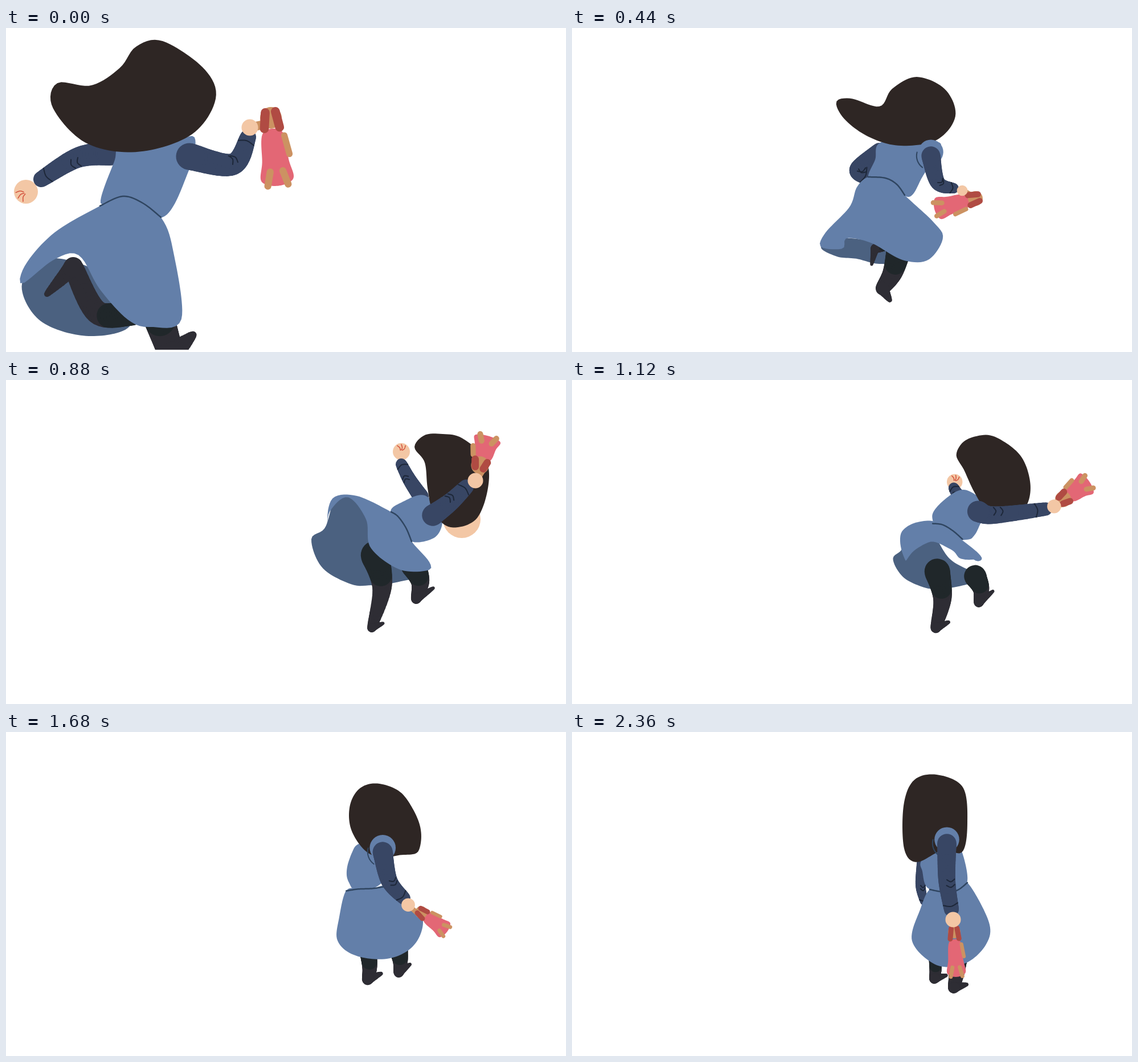
An HTML page with a canvas for the animation above (2720 ms loop, 983 by 570 pixels).

```html
<!DOCTYPE html>
<html lang="en">
<head>
<meta charset="utf-8">
<title>Running girl</title>
<style>
html, body { margin: 0; width: 100%; height: 100%; overflow: hidden; background: #fff; }
canvas { display: block; width: 100vw; height: 100vh; }
</style>
</head>
<body>
<canvas id="stage" width="983" height="570"></canvas>
<script>
const LOOP = 2720;
const BLUE = '#637fa9', SHADE = '#4b6180', NAVY = '#384664', HAIR = '#2e2624', SKIN = '#f3c7a5';
const LEG = '#2e2d34', THIGH = '#20272a', INK = '#1d2738', SEAM = '#2f4560';
const TAN = '#cc9262', PINK = '#e36775', RUST = '#b04b43', RED = '#d4553f';

// Blobs are outlines. Arms: shoulder, elbow, wrist, hand; legs: hip, knee, ankle, toe;
// both end with their widths. Doll: head x, y, angle in degrees, length, girth.
const stride = {
  at: 0,
  hair: '275,23 348,72 368,125 325,188 230,218 140,202 82,140 90,97 150,101 200,70 228,33',
  torso: '205,205 300,195 332,195 318,258 275,333 205,298 166,308 190,235',
  skirt: '205,296 240,308 272,333 292,385 308,512 255,526 215,514 165,460 128,400 85,407 28,450 35,415 85,360 165,313',
  under: '28,450 60,515 145,542 220,520 180,440 80,405',
  farArm: '185,220 126,228 62,266 35,288 44,28',
  nearArm: '322,226 398,240 425,192 428,175 48,28',
  legA: '220,500 160,500 118,420 72,468 48,34',
  legB: '262,490 275,530 290,575 328,540 60,44',
  collar: '250,190 230,180', face: '280,110',
  doll: [465, 158, 84, 128, 56]
};
const push = {
  at: 200,
  hair: '425,45 515,80 547,135 515,178 445,172 360,137 300,143 262,155 268,122 320,80 375,53',
  torso: '375,195 430,195 488,190 460,245 432,336 380,299 340,303 378,230',
  skirt: '375,299 405,310 427,336 488,395 480,450 430,480 372,448 318,416 292,422 284,445 217,444 230,408 270,387 310,325 340,303',
  under: '217,446 245,474 300,499 362,502 430,480 350,430 290,415',
  farArm: '385,220 342,260 352,285 372,285 40,34',
  nearArm: '470,220 483,282 540,250 549,243 46,26',
  legA: '350,410 335,490 298,568 285,590 76,40',
  legB: '470,415 488,450 503,485 523,450 44,18',
  collar: '456,183 422,202', face: '470,110',
  doll: [572, 230, -86, 82, 58]
};
const gather = {
  at: 440,
  hair: '605,86 655,108 673,155 640,197 575,207 520,191 478,160 464,130 490,124 540,138 562,107',
  torso: '545,200 640,200 640,220 615,262 598,293 582,294 545,264 520,263 532,232',
  skirt: '550,264 570,275 584,294 635,342 651,370 625,408 580,408 525,378 482,370 475,388 437,385 445,360 487,315 500,280 520,262',
  under: '437,385 465,402 500,406 540,415 590,408 540,380 480,370',
  farArm: '540,218 503,248 515,260 532,252 32,30',
  nearArm: '630,225 642,272 670,282 685,286 34,18',
  legA: '555,380 542,385 532,388 526,416 20,16',
  legB: '575,385 563,430 545,458 558,479 46,24',
  collar: '600,180 570,170', face: '620,150',
  doll: [708, 300, -195, 79, 38]
};
const spin = {
  at: 880,
  hair: '800,102 842,140 846,190 825,245 780,259 750,232 740,190 735,145 717,118 735,97 765,95',
  torso: '735,203 765,240 755,275 715,285 700,260 675,232 695,215',
  skirt: '688,240 702,260 712,284 743,320 740,335 690,333 640,295 632,245 600,206 568,232 564,268 566,225 580,204 620,205 676,232',
  under: '536,280 555,330 605,359 640,361 690,355 738,337 660,300 620,215 580,208 560,260',
  farArm: '728,205 708,175 694,148 694,126 28,20',
  nearArm: '749,238 780,215 808,188 824,177 38,26',
  legA: '648,308 660,365 642,436 662,428 52,16',
  legB: '715,325 727,355 720,385 750,366 46,18',
  collar: '800,200 800,180', face: '800,245',
  doll: [832, 150, -74, 57, 46]
};
const stagger = {
  at: 1440,
  hair: '665,97 715,122 755,160 755,200 715,229 675,212 628,180 618,140 633,106',
  torso: '630,180 688,205 660,230 660,262 650,275 578,277 575,250 592,208',
  skirt: '600,274 625,273 650,275 690,292 738,300 735,348 700,382 645,391 600,378 578,335 576,280',
  under: '600,360 650,375 690,360 640,320',
  farArm: '630,215 635,235 638,245 642,250 20,16',
  nearArm: '664,222 688,268 722,279 736,283 38,20',
  legA: '632,375 637,410 634,436 660,423 38,22',
  legB: '698,372 706,385 706,400 724,379 32,16',
  collar: '632,186 618,197', face: '690,165',
  doll: [762, 289, 20, 62, 34]
};
const settle = {
  at: 1960,
  hair: '645,84 683,98 694,140 692,200 684,222 650,205 605,221 584,195 584,130 605,92',
  torso: '610,215 655,180 680,195 690,260 670,278 622,279 608,235',
  skirt: '640,279 665,278 689,267 717,330 718,372 690,404 640,413 590,395 569,360 595,325 622,279',
  under: '610,380 650,395 690,380 650,340',
  farArm: '614,225 614,250 622,270 632,268 22,16',
  nearArm: '658,198 655,255 671,308 671,329 33,26',
  legA: '640,395 640,420 636,434 657,427 24,18',
  legB: '678,395 676,425 670,450 692,443 36,20',
  collar: '640,150 640,130', face: '640,140',
  doll: [690, 350, 57, 59, 28]
};
const rest = {
  at: 2360,
  hair: '640,75 686,97 694,160 685,211 650,208 605,229 583,205 582,130 600,85',
  torso: '614,225 650,185 678,195 694,262 665,281 625,275 615,245',
  skirt: '650,281 675,279 694,265 732,335 726,375 690,407 640,410 597,368 612,310 628,277',
  under: '610,380 650,395 690,380 650,340',
  farArm: '616,230 612,270 618,298 632,302 22,14',
  nearArm: '658,196 658,260 666,312 669,330 34,26',
  legA: '638,395 638,420 636,434 657,428 24,18',
  legB: '678,395 675,425 670,450 693,444 34,20',
  collar: '640,150 640,130', face: '640,140',
  doll: [671, 352, 87, 84, 32]
};

// From each moment on, the picture holds this long
const RHYTHM = [[0, 40], [40, 80], [440, 40], [520, 80], [880, 40], [920, 80], [1120, 80], [1840, 120], [2360, 360]];

const mix = (a, b, u) => Array.isArray(a) ? a.map((v, i) => mix(v, b[i], u)) : a + (b - a) * u;
const bump = (t, mid, half) => Math.max(0, 1 - Math.abs(t - mid) / half);
const parse = text => text.split(' ').map(pair => pair.split(',').map(Number));

// Catmull-Rom curve through the points
function curve(p, closed, steps = 12) {
  const n = p.length, out = [];
  const at = i => closed ? p[(i + n) % n] : p[Math.max(0, Math.min(n - 1, i))];
  for (let i = 0; i < (closed ? n : n - 1); i++) {
    const [a, b, c, d] = [-1, 0, 1, 2].map(k => at(i + k));
    for (let k = 0; k < steps; k++) {
      const t = k / steps;
      out.push([0, 1].map(j => b[j] + t / 2 * (c[j] - a[j] +
        t * (2 * a[j] - 5 * b[j] + 4 * c[j] - d[j] + t * (3 * b[j] - a[j] - 3 * c[j] + d[j])))));
    }
  }
  out.push(closed ? p[0] : p[n - 1]);
  return out;
}

// Even spacing lets outlines with different point counts blend
function even(line, count = 110) {
  const len = [0];
  for (let i = 1; i < line.length; i++)
    len.push(len[i - 1] + Math.hypot(line[i][0] - line[i - 1][0], line[i][1] - line[i - 1][1]));
  let j = 1;
  return Array.from({ length: count }, (_, i) => {
    const want = len[len.length - 1] * i / count;
    while (len[j] < want) j++;
    return mix(line[j - 1], line[j], (want - len[j - 1]) / (len[j] - len[j - 1] || 1));
  });
}

function prepare(pose) {
  const out = {};
  for (const [name, value] of Object.entries(pose)) {
    const pts = typeof value === 'string' ? parse(value) : value;
    out[name] = /hair|torso|skirt|under/.test(name) ? even(curve(pts, true)) : pts;
    if (name === 'skirt') out.waist = [pts[pts.length - 1], ...pts.slice(0, 3)];
  }
  return out;
}
const POSES = [stride, push, gather, spin, stagger, settle, rest].map(prepare);

function poseAt(t) {
  let i = POSES.length - 1;
  while (POSES[i].at > t) i--;
  const a = POSES[i], b = POSES[i + 1] || a;
  const u = b === a ? 0 : (t - a.at) / (b.at - a.at);
  const pose = {};
  for (const name in a) pose[name] = mix(a[name], b[name], u);

  // The doll flings the arm forward, the jump throws one leg back
  const fling = 45 * bump(t, 540, 100) + 60 * bump(t, 1120, 240);
  const kick = 150 * bump(t, 560, 115);
  for (const i of [2, 3]) {
    pose.nearArm[i][0] += fling;
    pose.legA[i][0] -= kick;
  }
  pose.doll[0] += fling;
  pose.legA[1][0] -= kick / 2;
  return pose;
}

const ctx = document.getElementById('stage').getContext('2d');

function fill(pts, color) {
  ctx.beginPath();
  for (const p of pts) ctx.lineTo(...p);
  ctx.fillStyle = color;
  ctx.fill();
}

function line(pts, color, width) {
  ctx.beginPath();
  for (const p of pts) ctx.lineTo(...p);
  ctx.strokeStyle = color;
  ctx.lineWidth = width;
  ctx.stroke();
}

function disc([x, y], r, color) {
  ctx.beginPath();
  ctx.arc(x, y, r, 0, 7);
  ctx.fillStyle = color;
  ctx.fill();
}

// Tapered limb; the colour may change along it
function limb(joints, from, to, colorAt) {
  const pts = curve(joints, false);
  for (let i = pts.length - 1; i > 0; i--) {
    const u = i / (pts.length - 1);
    line([pts[i - 1], pts[i]], colorAt(u), mix(from, to, u));
  }
  return pts;
}

function leg([hip, knee, ankle, toe, [from, to]]) {
  limb([hip, knee, ankle], from, to, u => u < 0.36 ? THIGH : LEG);
  limb([ankle, toe], to, to * 0.3, () => LEG);
}

function arm([shoulder, elbow, wrist, , [from, to]]) {
  const pts = limb([shoulder, elbow, wrist], from, to, () => NAVY);
  // Seam across the sleeve at u, between two sides of it
  const crease = (u, left, right) => {
    const i = Math.round(u * (pts.length - 2)), [x, y] = pts[i], [nx, ny] = pts[i + 1];
    const d = Math.hypot(nx - x, ny - y) || 1, w = mix(from, to, u) / 2;
    const at = (side, along) => [x + (-(ny - y) * side * w + (nx - x) * along) / d, y + ((nx - x) * side * w + (ny - y) * along) / d];
    line(curve([at(left, 0), at((left + right) / 2, 4), at(right, 0)], false), INK, 2);
  };
  crease(0.52, -0.9, 0);
  crease(0.62, -0.9, 0.1);
  crease(0.92, -0.95, 0.95);
}

function fingers([, , wrist, hand], r) {
  const dir = Math.atan2(hand[1] - wrist[1], hand[0] - wrist[0]);
  for (const k of [-0.6, 0, 0.6]) {
    const at = (d, bend) => [hand[0] + r * d * Math.cos(dir + k + bend), hand[1] + r * d * Math.sin(dir + k + bend)];
    line(curve([at(0.2, 0), at(0.5, 0.2), at(0.85, 0)], false), RED, 1.6);
  }
}

function drawDoll([x, y, deg, len, girth], hand) {
  const a = deg * Math.PI / 180, c = Math.cos(a), s = Math.sin(a);
  const at = ([u, v]) => [x + u * len * c + v * girth * s, y + u * len * s - v * girth * c];
  const strap = (p, q, w, color) => line([at(p), at(q)], color, w * girth);
  const dress = [[0.2, -0.3], [0.2, 0.3], [0.6, 0.42], [0.86, 0.5], [0.94, 0], [0.86, -0.5], [0.6, -0.42]];
  fill(curve(dress.map(at), true), PINK);
  for (const side of [-1, 1]) strap([0.74, side * 0.2], [0.93, side * 0.32], 0.22, TAN);
  strap([0.26, 0.36], [0.52, 0.46], 0.2, TAN);
  line([at([0.08, -0.2]), hand], TAN, girth * 0.28);
  disc([x, y], girth * 0.34, TAN);
  for (const side of [-1, 1]) strap([-0.08, side * 0.16], [0.14, side * 0.24], 0.28, RUST);
}

function draw(t) {
  const p = poseAt(t);
  const [shoulder, , wrist, hand, [thick, thin]] = p.nearArm;
  const hanging = wrist[1] > shoulder[1];
  const farR = p.farArm[4][1] * 0.75;

  ctx.fillStyle = '#fff';
  ctx.fillRect(0, 0, 983, 570);
  ctx.save();
  ctx.beginPath();
  ctx.rect(0, 0, 983, 566);
  ctx.clip();
  ctx.lineCap = ctx.lineJoin = 'round';

  disc(p.farArm[3], farR, SKIN);
  fingers(p.farArm, farR);
  arm(p.farArm);
  fill(p.under, SHADE);
  leg(p.legA);
  leg(p.legB);
  fill(p.skirt, BLUE);
  fill(p.torso, BLUE);
  line(curve(p.waist, false), SEAM, 2.5);
  line(p.collar, NAVY, 16);
  disc(p.face[0], 33, SKIN);
  fill(p.hair, HAIR);
  if (hanging) {
    disc([shoulder[0], shoulder[1] - thick * 0.2], thick * 0.64, BLUE);
    ctx.beginPath();
    ctx.arc(...shoulder, thick * 0.74, 2.2, 3.4);
    ctx.strokeStyle = SEAM;
    ctx.lineWidth = 2;
    ctx.stroke();
  }
  arm(p.nearArm);
  drawDoll(p.doll, hand);
  disc(hand, thin * 0.52, SKIN);
  ctx.restore();
}

function held(t) {
  const [from, hold] = RHYTHM.filter(r => r[0] <= t).pop();
  return from + Math.floor((t - from) / hold) * hold;
}

const start = performance.now();
function tick() {
  draw(held((performance.now() - start) % LOOP));
  requestAnimationFrame(tick);
}
tick();
</script>
</body>
</html>
```
